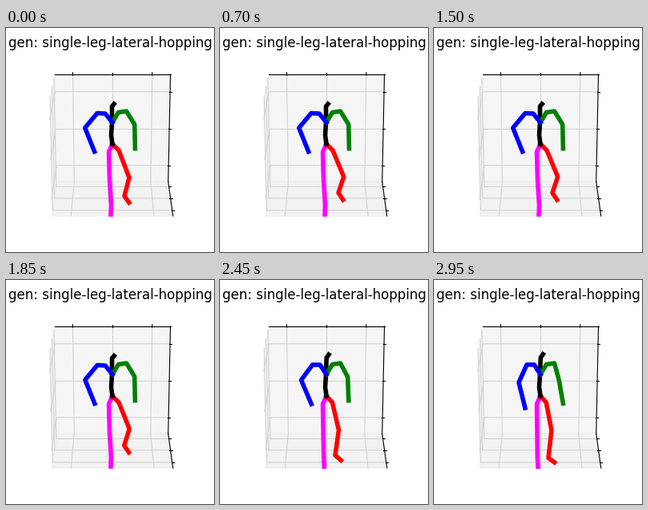
Animation, 260 px wide and 280 px high, one loop 3000 ms. Source, as a matplotlib script:

```python
import numpy as np
import matplotlib.pyplot as plt
from matplotlib.animation import FuncAnimation

W, H, DPI = 260, 280, 100
FRAMES, STEP = 60, 50
ELEV = np.radians(110)
BOX = np.array([0.5953, 0.5953, 0.4465])  # half sizes of the 3D box
CENTER, SCALE, DIST = (133.1, 144.6), 1243, 10
TICKS = np.array([-1, 0, 1]) * 0.5 / (0.7 * 25 / 24)

fig = plt.figure(figsize=(W / DPI, H / DPI), dpi=DPI, facecolor="white")
ax = fig.add_axes([0, 0, 1, 1])
ax.set(xlim=(0, W), ylim=(H, 0))
ax.axis("off")


def project(*points):
    """Perspective view of box points given in -1..1 units."""
    x, y, z = (np.array(points, float) * BOX).T
    up = np.sin(ELEV) * y + np.cos(ELEV) * z
    depth = DIST + np.cos(ELEV) * y - np.sin(ELEV) * z
    return CENTER[0] + SCALE * x / depth, CENTER[1] - SCALE * up / depth


def line3d(*points, color="black", zorder=3):
    ax.plot(*project(*points), color=color, lw=0.8, zorder=zorder)


def pane(shade, *corners):
    ax.fill(*project(*corners), fc=(shade,) * 3 + (0.5,),
            ec=(shade,) * 3 + (0.5,), lw=1, zorder=1)


pane(0.95, (-1, -1, -1), (-1, 1, -1), (-1, 1, 1), (-1, -1, 1))
pane(0.90, (-1, -1, -1), (1, -1, -1), (1, -1, 1), (-1, -1, 1))
pane(0.925, (-1, -1, -1), (1, -1, -1), (1, 1, -1), (-1, 1, -1))

IN, OUT = 1 - 0.016, 1 + 0.032
for t in TICKS:
    for grid in ([(t, 1, -1), (t, -1, -1), (t, -1, 1)],
                 [(1, t, -1), (-1, t, -1), (-1, t, 1)],
                 [(1, -1, t), (-1, -1, t), (-1, 1, t)]):
        line3d(*grid, color="#d2d2d2", zorder=2)
    line3d((t, IN, -1), (t, OUT, -1))
    line3d((IN, t, -1), (OUT, t, -1))
    line3d((IN, -1, t), (OUT, -1, t))

line3d((-1, 1, -1), (1, 1, -1))
line3d((1, -1, -1), (1, 1, -1))
line3d((1, -1, -1), (1, -1, 1))

ax.text(130, 24, "gen: single-leg-lateral-hopping", fontsize=12,
        family="DejaVu Sans", ha="center", va="baseline")

# Tucked pose, one chain of joints per limb, in drawing order
HIP, CHEST = (133, 145), (133, 118)
LIMBS = {
    "magenta": [HIP, (128.5, 155), (129.5, 190), (131.5, 222), (131, 233)],
    "red": [HIP, (141, 153), (154.7, 186), (148, 206), (153.8, 214.8)],
    "black": [HIP, (131.5, 134), (132.5, 118), (132.5, 98), (135, 95)],
    "green": [CHEST, (140.5, 105.5), (150.5, 104), (160.7, 120.5),
              (161.4, 150.7)],
    "blue": [CHEST, (124, 107), (114, 106.5), (98.7, 124.8), (110.6, 154.5)],
}

# Each move eases in between two times and shifts the last joints of a limb
MOVES = [
    # the raised foot pulls up
    (0, 700, {"red": [(0.7, -1), (0, -4), (0, -3.5)]}),
    # the leg reaches down and the body leans
    (1700, 2750, {
        "red": [(-0.8, 0), (-7.8, 2), (-5, 16.4), (-3.2, 13.2)],
        "magenta": [(-0.5, 0), (-2.2, 0), (-1, 0.5)],
        "black": [(0.8, -1), (1.2, -2.2)],
        "green": [(-0.5, 0), (-1, -1)],
        "blue": [(1.2, -1.2), (2, -0.7), (2.5, -0.4), (4.8, -0.5)],
    }),
    # the arms swing
    (2250, 3050, {"green": [(-4.2, 4.6), (1, 4.8)],
                  "blue": [(5, 3.8), (-1.6, 6.2)]}),
]


def ease(t, start, end):
    u = np.clip((t - start) / (end - start), 0, 1)
    return u * u * (3 - 2 * u)


def pose(t):
    joints = {color: np.array(chain, float) for color, chain in LIMBS.items()}
    for start, end, shifts in MOVES:
        # the first move ends in the tucked pose
        amount = ease(t, start, end) - (start == 0)
        for color, shift in shifts.items():
            joints[color][-len(shift):] += amount * np.array(shift)
    return joints


lines = {color: ax.plot([], [], color=color, lw=4, zorder=5,
                        solid_capstyle="projecting",
                        solid_joinstyle="round")[0] for color in LIMBS}


def update(frame):
    for color, joints in pose(frame * STEP).items():
        lines[color].set_data(*joints.T)
    return list(lines.values())


anim = FuncAnimation(fig, update, frames=FRAMES, interval=STEP,
                     repeat=True, repeat_delay=0)
plt.show()
```
